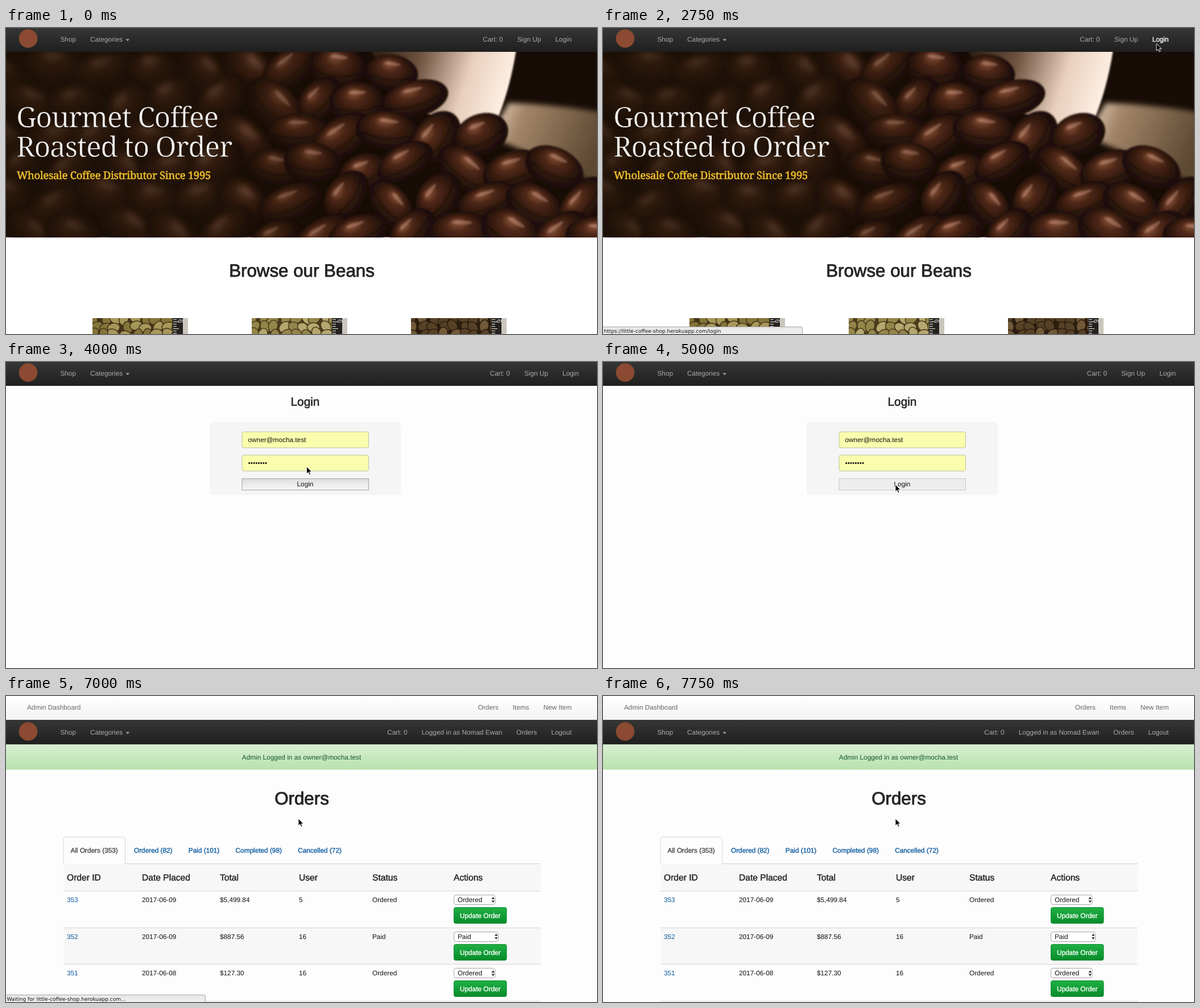
Animation, 1039 px wide and 539 px high, one loop 8 s. Source, as an HTML page:

```html
<!DOCTYPE html>
<html lang="en">
<head>
<meta charset="utf-8">
<title>Coffee shop login</title>
<style>
html, body { margin: 0; width: 100%; height: 100%; overflow: hidden; background: #fff; }
svg { display: block; width: 100%; height: 100%; }
text { font: 11.8px "Liberation Sans", Arial, sans-serif; text-rendering: geometricPrecision; white-space: pre; }
.mid { text-anchor: middle; }
.end { text-anchor: end; }
.medium { stroke: currentColor; stroke-width: .03em; }
.h1 { font-size: 31.3px; }
.h3 { font-size: 20.8px; }
.th { font-size: 15.6px; }
.slab { font: 300 50px "Noto Serif", serif; letter-spacing: -1.4px; stroke: #1c1109; stroke-width: .8px; }
.tagline { font: 18.5px "Noto Serif", serif; letter-spacing: -.3px; }
.status { font: 9px "DejaVu Sans", sans-serif; }
</style>
</head>
<body>
<svg id="stage" viewBox="0 0 1039 539" xmlns="http://www.w3.org/2000/svg"></svg>
<script>
const LOOP = 8000;
const STEP = 250;
const stage = document.getElementById('stage');

const rect = (x, y, w, h, fill, more = '') =>
  `<rect x="${x}" y="${y}" width="${w}" height="${h}" fill="${fill}" ${more}/>`;
const box = (x, y, w, h, fill, stroke, r = 0) =>
  rect(x + .5, y + .5, w - 1, h - 1, fill, `stroke="${stroke}" rx="${r}"`);
const text = (x, y, s, fill = '#111', cls = '', more = '') =>
  `<text x="${x}" y="${y}" fill="${fill}" color="${fill}" class="${cls}" ${more}>${s}</text>`;
const line = (y, x1 = 101, x2 = 940, color = '#d5d5d5') => rect(x1, y, x2 - x1, 1, color);
const oval = (rx, ry, fill, more = '') => `<ellipse rx="${rx}" ry="${ry}" fill="${fill}" ${more}/>`;

// labels in one line, a fixed gap apart
const spread = (labels, gap = 25) => labels.map((s, i) => `<tspan dx="${i && gap}">${s}</tspan>`).join('');

const gradient = (id, stops, dir = 'x2="0" y2="1"') =>
  `<linearGradient id="${id}" ${dir}>` + stops.map(([at, color, alpha = 1]) =>
    `<stop offset="${at}" stop-color="${color}" stop-opacity="${alpha}"/>`).join('') + '</linearGradient>';

function random(seed) {
  return () => (seed = (seed * 16807) % 2147483647) / 2147483647;
}

const defs = `<defs>
  ${gradient('nav', [[0, '#363636'], [1, '#1f1f1f']])}
  ${gradient('admin', [[0, '#ffffff'], [1, '#f3f3f3']])}
  ${gradient('alert', [[0, '#d9efd3'], [1, '#b8e2ae']])}
  ${gradient('green', [[0, '#20b044'], [1, '#078c2b']])}
  ${gradient('bar', [[0, '#e6e6e6'], [1, '#f1f1f1']])}
  ${gradient('button', [[0, '#dcdcdc'], [.5, '#ececec'], [1, '#f4f4f4']])}
  ${gradient('cup', [[0, '#2a1a0f'], [.35, '#6f5340'], [.7, '#e9cfbd'], [1, '#fff0e4']], 'x2="1" y2=".2"')}
  ${gradient('saucer', [[0, '#f0dac4'], [.3, '#a3866a'], [1, '#5d4832']], 'x2="1" y2=".3"')}
  ${gradient('shade', [[0, '#1d1206', .72], [.35, '#1d1206', .6], [.58, '#1d1206', 0]], 'x2="1"')}
  <radialGradient id="bean" cx=".5" cy=".5" r=".56" fx=".42" fy=".22">
    <stop offset="0" stop-color="#8f5840"/><stop offset=".3" stop-color="#4f2817"/>
    <stop offset=".7" stop-color="#28130a"/><stop offset="1" stop-color="#110804"/>
  </radialGradient>
  <filter id="soft"><feGaussianBlur stdDeviation="1.5"/></filter>
  <filter id="blur"><feGaussianBlur stdDeviation="5"/></filter>
  <clipPath id="hero"><rect y="42" width="1039" height="326.5"/></clipPath>
  <clipPath id="thumb"><rect width="168" height="28"/></clipPath>
</defs>`;

function bean(x, y, rx, ry, turn) {
  return `<g transform="translate(${x} ${y}) rotate(${turn})">` + oval(rx, ry, 'url(#bean)') +
    oval(rx * .3, ry * .09, '#d3a08a', `cy="${-ry * .5}" opacity=".4"`) +
    `<path d="M${-rx * .8} ${ry * .2}Q0 ${ry * .6} ${rx * .8} ${ry * .1}" fill="none" stroke="#140804" stroke-width="2"/></g>`;
}

// heap of beans, out of focus on the left, sloping down under the cup
function heap() {
  const rnd = random(7);
  const slope = x => 58 + Math.max(0, x - 640) * .48;
  let far = '', near = '';
  for (let row = 0; row < 6; row++) {
    for (let col = 0; col < 14; col++) {
      const x = col * 84 + row % 2 * 42 + rnd() * 24 - 12;
      const y = 72 + row * 58 + rnd() * 20 - 10;
      const shape = bean(x, y, 46 + rnd() * 16, 30 + rnd() * 10, rnd() * 110 - 55);
      if (y < slope(x)) continue;
      if (x < 440) far += shape;
      else near += shape;
    }
  }
  return `<g filter="url(#blur)">${far}</g><g filter="url(#soft)">${near}</g>`;
}

function hero() {
  return `<g clip-path="url(#hero)">
    ${rect(0, 42, 1039, 327, '#170d06')}
    <g filter="url(#blur)">
      <path d="M884 132Q965 134 1055 150V280L850 190Z" fill="url(#saucer)"/>
    </g>
    <g filter="url(#soft)">
      <path d="M640 38H897Q886 110 860 170L840 200L700 130Z" fill="url(#cup)"/>
    </g>
    ${heap()}
    ${rect(0, 42, 1039, 327, 'url(#shade)')}
  </g>` +
  text(18, 175, 'Gourmet Coffee', '#f4f1ee', 'slab') +
  text(18, 227, 'Roasted to Order', '#f4f1ee', 'slab') +
  text(19, 266, 'Wholesale Coffee Distributor Since 1995', '#f0c22e', 'tagline medium');
}

function thumb(i, dark, mid, light) {
  const rnd = random(11 + i * 20);
  let out = rect(0, 0, 168, 28, dark);
  for (let n = 0; n < 27; n++) {
    const place = `translate(${n % 9 * 18 + rnd() * 8} ${(n / 9 | 0) * 13 + rnd() * 5}) rotate(${rnd() * 180})`;
    out += oval(11, 8, rnd() < .5 ? mid : light, `stroke="${dark}" stroke-width="1.5" transform="${place}"`);
  }
  out += rect(141, 0, 27, 28, '#cbc6bb') + rect(141, 0, 18, 28, '#24221f');
  for (let y = 2; y < 28; y += 4) out += rect(142, y, y % 3 ? 6 : 10, 1.2, '#d8d4ca');
  out += text(0, 0, '6', '#ddd', '', 'transform="translate(151 2) rotate(90)"');
  return `<g transform="translate(${152 + i * 280} 511)" clip-path="url(#thumb)">${out}</g>`;
}

function navbar(y, right, links) {
  return `<g transform="translate(0 ${y})">` + rect(0, 0, 1039, y ? 43.5 : 42, 'url(#nav)') +
    `<circle cx="39" cy="${y ? 20.5 : 18.5}" r="16.3" fill="#8b4a31"/>
    <g transform="translate(0 ${y ? 2 : 0})">` +
    text(95.5, 24, spread(['Shop', 'Categories']), '#aaa') +
    '<path d="M210.500 19.500h6.600l-3.300 3.400z" fill="#aaa"/>' +
    text(right, 24, spread(links), '#aaa', 'end') + '</g></g>';
}

function home() {
  return rect(0, 0, 1039, 539, '#fff') + hero() +
    navbar(0, 994.5, ['Cart: 0', 'Sign Up', '<tspan id="loginLink" color="#fff">Login</tspan>']) +
    text(520, 438, 'Browse our Beans', '#262626', 'mid medium h1') +
    thumb(0, '#43351a', '#857439', '#a8975a') +
    thumb(1, '#4a3c1c', '#94854a', '#b5a76f') +
    thumb(2, '#2b1d0f', '#574126', '#725a38');
}

function login() {
  const field = y => box(414.5, y, 223.5, 29, '#f9fdac', '#bfc0a4', 3);
  const button = (id, fill, stroke) => `<g id="${id}">${box(414.5, 205, 223.5, 21, fill, stroke)}</g>`;
  let dots = '';
  for (let i = 0; i < 8; i++) dots += `<circle cx="${427.7 + i * 4.2}" cy="178" r="1.55"/>`;
  return rect(0, 0, 1039, 539, '#fdfdfd') +
    navbar(0, 1007, ['Cart: 0', 'Sign Up', 'Login']) +
    text(526, 77, 'Login', '#262626', 'mid medium h3') +
    rect(358, 106, 336, 128, '#f5f5f5', 'rx="5"') +
    field(122.5) + text(425.5, 141, 'owner@mocha.test') + field(163.5) + dots +
    button('idle', 'url(#button)', '#a3a3a3') + button('pressed', '#ededed', '#c9c9c9') +
    text(526, 219, 'Login', '#111', 'mid');
}

const columns = [107, 239, 376, 515, 644, 787];

function order(i, cells) {
  const y = 343 + i * 64.7;
  const top = Math.round(y);
  const status = cells[4];
  const w = status === 'Paid' ? 79 : 73.5;
  return rect(101, y, 839, 64.7, i % 2 ? '#f7f7f7' : '#fdfdfd') + line(top) +
    cells.map((s, c) => text(columns[c], y + 20, s, c ? '#111' : '#0b5aa0')).join('') +
    box(787, top + 7, w, 18, '#fff', '#a5a5a5', 4) + text(794, y + 20, status) +
    `<path d="M${780 + w} ${y + 14.8}h5.6l-2.8-4zm0 2.4h5.6l-2.8 4z" fill="#333"/>` +
    box(787, top + 29, 93.5, 29, 'url(#green)', '#0b8a2c', 3) +
    text(833.7, y + 48, 'Update Order', '#fff', 'mid medium');
}

function orders() {
  const heads = ['Order ID', 'Date Placed', 'Total', 'User', 'Status', 'Actions'];
  const tabs = ['Ordered (82)', 'Paid (101)', 'Completed (98)', 'Cancelled (72)'];
  const rows = [
    ['353', '2017-06-09', '$5,499.84', '5', 'Ordered'],
    ['352', '2017-06-09', '$887.56', '16', 'Paid'],
    ['351', '2017-06-08', '$127.30', '16', 'Ordered']
  ];
  return rect(0, 0, 1039, 539, '#fdfdfd') + rect(0, 0, 1039, 42, 'url(#admin)') +
    text(37, 24, 'Admin Dashboard', '#666') +
    text(994.5, 24, spread(['Orders', 'Items', 'New Item']), '#666', 'end') +
    navbar(42, 994.5, ['Cart: 0', 'Logged in as Nomad Ewan', 'Orders', 'Logout']) +
    rect(0, 85.5, 1039, 43.5, 'url(#alert)') + line(128.5, 0, 1039, '#a9d3a0') +
    text(519.5, 111.5, 'Admin Logged in as owner@mocha.test', '#14572a', 'mid') +
    text(520, 191, 'Orders', '#262626', 'mid medium h1') +
    rect(101, 296, 839, 47, '#f7f7f7') + line(295, 101, 940, '#cfcfcf') +
    '<path d="M101 296V252.500q0-4 4-4H205.500q4 0 4 4V296" fill="#fdfdfd" stroke="#d5d5d5"/>' +
    text(113.5, 276, 'All Orders (353)', '#444', 'medium') +
    text(225, 276, spread(tabs, 28.3), '#0b5aa0', 'medium') +
    heads.map((s, c) => text(columns[c], 325, s, '#262626', 'medium th')).join('') +
    rows.map((cells, i) => order(i, cells)).join('') + line(537);
}

stage.innerHTML = defs +
  `<g id="home">${home()}</g><g id="login">${login()}</g><g id="orders">${orders()}</g>` +
  `<g id="status"><path d="M-1 526.5H348q2.500 0 2.500 2.500V540H-1Z" fill="url(#bar)" stroke="#a9a9a9"/>
    ${text(1.5, 536.5, '', '#111', 'status', 'id="statusText"')}</g>` +
  '<path id="cursor" d="M.5 .5V13L3.400 10.300L5.400 15L7.500 14.100L5.500 9.500H9.500Z" fill="#000" stroke="#fff" stroke-width=".9"/>';

const parts = {};
for (const node of stage.querySelectorAll('[id]')) parts[node.id] = node;
const show = (id, on) => parts[id].setAttribute('display', on ? 'inline' : 'none');

// the pointer takes one point per step, then rests on the last
const glides = [
  { from: 1000, points: [[794, 21], [935, 75], [966, 47], [974, 28], [976, 23]] },
  { from: 2750, points: [[972.5, 27]] },
  { from: 3750, points: [[692.5, 174], [528, 184], [505, 227], [513.5, 215.5]] }
];

function pointer(t) {
  const glide = glides.filter(g => g.from <= t).pop();
  if (!glide) return null;
  const step = Math.floor((t - glide.from) / STEP);
  return glide.points[Math.min(step, glide.points.length - 1)];
}

function draw(t) {
  show('home', t < 3250);
  show('login', t >= 3250 && t < 7000);
  show('orders', t >= 7000);
  show('idle', t < 5000);
  show('pressed', t >= 5000);

  const hover = t >= 2750;
  parts.loginLink.setAttribute('fill', hover ? '#fff' : '#aaa');
  parts.loginLink.classList.toggle('medium', hover);

  const linked = hover && t < 3500;
  const waiting = t >= 5500 && t < 7750;
  show('status', linked || waiting);
  parts.statusText.textContent = linked
    ? 'https://little-coffee-shop.herokuapp.com/login'
    : 'Waiting for little-coffee-shop.herokuapp.com...';

  const tip = pointer(t);
  show('cursor', tip);
  if (tip) parts.cursor.setAttribute('transform', `translate(${tip})`);
}

const start = performance.now();
function tick() {
  draw((performance.now() - start) % LOOP);
  requestAnimationFrame(tick);
}
draw(0);
requestAnimationFrame(tick);
</script>
</body>
</html>
```
